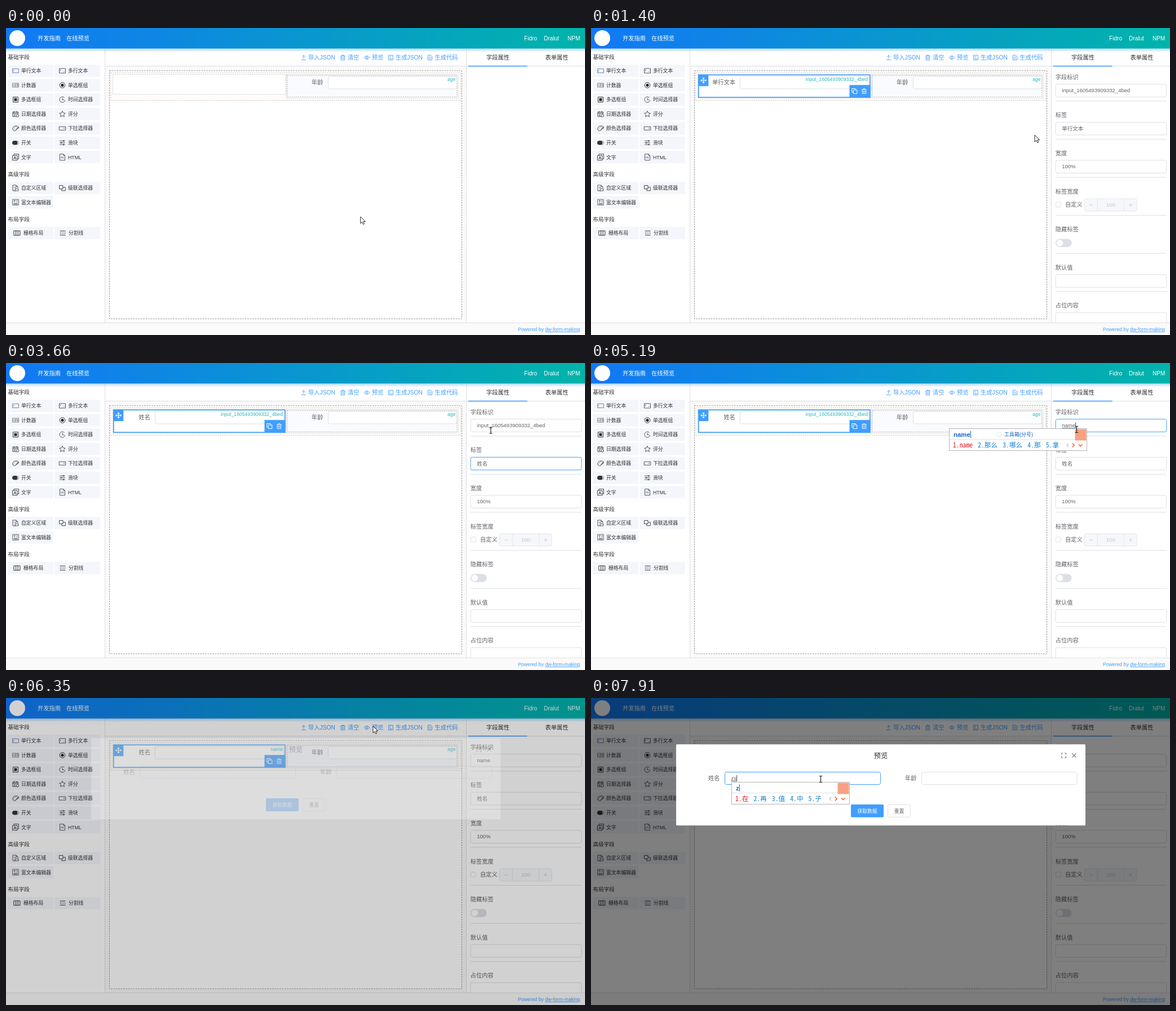
These frames come from a looping animation (1027x545 px, 7990 ms). An HTML page:

```html
<!DOCTYPE html>
<html lang="zh-CN">
<head>
<meta charset="utf-8">
<title>表单设计器</title>
<style>
html, body { margin: 0; width: 100%; height: 100%; overflow: hidden; background: #fff; }
svg { display: block; width: 1027px; height: 545px; }
text { font-family: "Liberation Sans", "Noto Sans CJK SC", "Noto Sans CJK", sans-serif; white-space: pre; }
.cand { font-family: "Noto Sans Mono CJK SC", "Liberation Mono", "Noto Sans CJK SC", monospace; }
</style>
</head>
<body>
<svg id="stage" viewBox="0 0 1027 545" xmlns="http://www.w3.org/2000/svg"></svg>
<script>
const LOOP = 7990;
const BLUE = '#409eff', INK = '#303133', GREY = '#606266', EDGE = '#dcdfe6';
const $ = id => document.getElementById(id);

// drawing helpers
const text = (x, y, s, size, fill, extra = '') =>
  `<text x="${x}" y="${y}" font-size="${size}" fill="${fill}" ${extra}>${s}</text>`;
const rect = (x, y, w, h, fill, extra = '') =>
  `<rect x="${x}" y="${y}" width="${w}" height="${h}" fill="${fill}" ${extra}/>`;
const path = (d, stroke, width = 1, extra = '') =>
  `<path d="${d}" fill="none" stroke="${stroke}" stroke-width="${width}" ${extra}/>`;
const dashed = (x, y, w, h, fill, stroke, dash = '2.2 1.6') =>
  rect(x, y, w, h, fill, `stroke="${stroke}" stroke-width=".9" stroke-dasharray="${dash}"`);
const input = (x, y, w, h, id = '') =>
  rect(x, y, w, h, '#fff', `rx="3" stroke="${EDGE}" ${id && `id="${id}"`}`);
const group = (id, body, extra = '') => `<g id="${id}" ${extra}>${body}</g>`;
const at = (x, y, body) => `<g transform="translate(${x} ${y})">${body}</g>`;

const page = 'M-4.5 -5.5H2L4.5 -3V5.5H-4.5ZM2 -5.5V-3H4.5';
const solid = d => `<path d="${d}" fill="#333"/>`;
const icons = {
  line: path('M-5.5 -3.5H5.5V3.5H-5.5ZM-3.5 -1.5V1.5', '#68789c', .9),
  area: path('M-5.5 -4H5.5V4H-5.5ZM-3.5 -2.2V.5', '#444', .9) + path('M2 2.2L4 .2', '#c44', .8),
  count: path('M-5.5 -3.5H5.5V3.5H-5.5ZM-3.7 -1.8V1.8M-1.5 -1.8H.8V0H-1.5V1.8H.8M2 -1.8H4V1.8H2M2 0H4', '#555', .7),
  radio: '<circle r="4.8" fill="none" stroke="#333"/><circle r="2.6" fill="#222"/>',
  check: path('M-4.5 -4.5H4.5V4.5H-4.5Z', '#333') + rect(-2.5, -2.5, 5, 5, '#222'),
  clock: path('M4.9 1A5 5 0 1 1 3.6 -3.5M0 -3V.5H3.2', '#444', .9),
  date: path('M1 4.5H-5V-3.5H4.5V0M-5 -1.2H4.5M-2.6 -5V-2.4M2 -5V-2.4M-3 1H0M-3 2.8H-1', '#333', .9) +
    '<circle cx="3.3" cy="3" r="2.3" fill="none" stroke="#333" stroke-width=".9"/>',
  star: path('M0 -5.3L1.6 -1.8L5.4 -1.4L2.5 1.1L3.4 4.9L0 2.9L-3.4 4.9L-2.5 1.1L-5.4 -1.4L-1.6 -1.8Z', '#444', .9),
  color: path('M-1.5 4.3C-7 4 -6.5 -3 -.5 -4.3C5 -5 6.5 -1 4.5 .5C2.5 1.5 1.5 .5 1 2C.8 3.5 0 4.4 -1.5 4.3Z', '#333', .9) +
    path('M-3.5 1.5h1M-3 -1.3h1M0 -2.6h1M2.8 -1.5h1M0 3L5.5 -3', '#333', 1),
  select: path('M-5.8 -3H5.8V3H-5.8Z', '#444', .9) + solid('M1.8 -.8H4.4L3.1 .9Z'),
  toggle: path('M-2.3 -3.3H2.3A3.3 3.3 0 0 1 2.3 3.3H-2.3A3.3 3.3 0 0 1 -2.3 -3.3Z', '#777', .8) +
    solid('M-2.3 -3.5H0A3.5 3.5 0 0 1 0 3.5H-2.3A3.5 3.5 0 0 1 -2.3 -3.5Z'),
  slider: path('M-5 -3.3H5M-5 0H5M-5 3.3H5', '#444', .9) + path('M2 -4.5v2.4M-2 -1.2v2.4M2 2.1v2.4', '#333', 1.4),
  words: path('M-5.5 -3H3V5.5H-5.5ZM-3 -3V-5.5H5.5V3H3M-3.4 3.8L-1.2 -1.3L1 3.8M-2.6 2H.2', '#333', .9),
  html: path(page, '#444', .9) + path('M-2.8 1.5h1.5M0 1.5h2.6M-2.8 -.2h5', '#487bb0', 1),
  custom: path('M0 5H-5V-5H1L4 -2V0M1 -5V-2H4M-3 -1H1', '#444', .9) + path('M-1 1.5H5V5H-1Z', '#444', .9),
  cascade: path('M-5.5 -4.5H1V1.5H-5.5ZM-1.2 1.5V4.8H5.3V-1.2H1', '#333', .9),
  rich: path('M-5.3 -5H5.3V5H-5.3ZM-3.5 -2.8H0M-1.8 -2.8V.3M1.5 -2.8H3.7M1.5 -.5H3.7M-3.5 2H3.7M-3.5 3.5H3.7', '#444', .8),
  grid: path('M-5.5 -4H5.5V4H-5.5ZM-1.8 -4V4M1.8 -4V4', '#333', 1),
  rule: path('M-5 -3.6H5M-5 0H-2M-.8 0H1.4M2.6 0H5M-5 3.6H5', '#333', 1)
};

function tile(name, icon, col, cy, dx = 0) {
  const x = 3 + col * 83;
  return rect(x, cy - 11, 81, 22, '#f4f6fc') +
    at(17 + col * 83 + dx * .6, cy, icons[icon]) +
    text(27 + col * 83 + dx, cy + 3.2, name, 8.8, '#333');
}

const sidebar = [
  ['单行文本', 'line'], ['多行文本', 'area'], ['计数器', 'count'], ['单选框组', 'radio'],
  ['多选框组', 'check'], ['时间选择器', 'clock'], ['日期选择器', 'date'], ['评分', 'star'],
  ['颜色选择器', 'color'], ['下拉选择器', 'select'], ['开关', 'toggle'], ['滑块', 'slider'],
  ['文字', 'words'], ['HTML', 'html']
].map(([n, i], k) => tile(n, i, k % 2, 76 + (k >> 1) * 25.55)).join('') +
  tile('自定义区域', 'custom', 0, 284) + tile('级联选择器', 'cascade', 1, 284) +
  tile('富文本编辑器', 'rich', 0, 309.3) +
  tile('栅格布局', 'grid', 0, 364, 4) + tile('分割线', 'rule', 1, 364, 1) +
  text(3.5, 55.2, '基础字段', 9.6, INK) + text(3.5, 262.7, '高级字段', 9.6, INK) +
  text(3.5, 342.7, '布局字段', 9.6, INK);

const trash = c => path('M-4.2 -2.8H4.2M-1.5 -2.8V-4.3H1.5V-2.8M-3.2 -2.8V4.4H3.2V-2.8M-1.1 -1V2.7M1.1 -1V2.7', c, .9);
const sheet = path('M-3.6 -4.2H1.6L3.6 -2.2V4.2H-3.6ZM-1.8 -.8H1.8M-1.8 1.6H1.8', BLUE, .9);
const toolbar = [
  [528, 536, '导入JSON', path('M-4 4H4M0 2V-4M-2.8 -1.2L0 -4L2.8 -1.2', BLUE, .9)],
  [597.5, 606, '清空', trash(BLUE)],
  [640, 649, '预览', path('M-5 0Q0 -6 5 0Q0 6 -5 0Z', BLUE, .9) + `<circle r="1.6" fill="none" stroke="${BLUE}" stroke-width=".9"/>`],
  [682.5, 691, '生成JSON', path('M-3.8 -4.2H3.8V4.2H-3.8ZM-2 -2H0M-2 0H-.5M-2 2.2H2', BLUE, .9)],
  [752, 760.5, '生成代码', sheet]
].map(([ix, tx, s, icon]) => at(ix, 52.5, icon) + text(tx, 56.2, s, 10.25, BLUE)).join('');

const header = rect(0, 36, 1027, 7, 'url(#glow)') + rect(0, 0, 1027, 36.4, 'url(#bar)') +
  '<circle cx="20" cy="18" r="14" fill="#fff"/>' +
  text(56, 21.7, '开发指南', 10.25, '#fff') + text(107, 21.7, '在线预览', 10.25, '#fff') +
  text(919, 21.7, 'Fidro', 10.1, '#fff') + text(954, 21.7, 'Dralut', 10.1, '#fff') +
  text(996, 21.7, 'NPM', 10.1, '#fff');

const frame = rect(176, 68, 640, 455, '#fafafa') +
  path('M175.5 37V523M816.5 37V523', '#dfdfdf') + path('M176 67.7H816M817 67.7H1027', '#e0e3e9', 1.3) +
  dashed(183.5, 75.8, 625, 440.4, '#fff', '#888', '2.6 1.8') +
  rect(820, 66.8, 104.5, 1.6, BLUE) +
  text(872.5, 55.6, '字段属性', 10.25, INK, 'text-anchor="middle"') +
  text(977, 55.6, '表单属性', 10.25, INK, 'text-anchor="middle"') +
  rect(0, 523, 1027, 22, '#fafafa') + path('M0 523.5H1027', '#e0e0e0') +
  text(908, 538, `Powered by <tspan text-decoration="underline">dw-form-making</tspan>`, 8.66, BLUE);

const MODEL = 'rgba(2,171,181,.85)';
const canvas = dashed(185.5, 79.5, 621, 49, '#fefcf9', '#d0c8bf') +
  dashed(497.3, 82.5, 304.7, 42.5, '#fff', '#ccc') +
  dashed(499, 84.2, 301, 38.3, '#f9fbff', '#aaa') +
  input(571.5, 86, 228, 22) + text(542, 100.3, '年龄', 10.25, GREY) +
  text(797.5, 94.3, 'age', 8.66, MODEL, 'text-anchor="end"');

const emptyCell = dashed(189.5, 82.5, 306.5, 35.2, '#fff', '#ccc');
const field = dashed(189.5, 82.5, 306.5, 42.5, '#fff', '#ccc') +
  input(264.5, 86, 228, 22) +
  rect(190.8, 83.3, 304, 39.8, 'none', `stroke="${BLUE}" stroke-width="1.7"`) +
  rect(190, 82.6, 18.3, 20.6, BLUE) + rect(458.5, 101.2, 37.2, 22.7, BLUE) +
  at(199.5, 93, path('M-4.5 0H4.5M0 -4.5V4.5M-3 -1.6L-4.7 0L-3 1.6M3 -1.6L4.7 0L3 1.6M-1.6 -3L0 -4.7L1.6 -3M-1.6 3L0 4.7L1.6 3', '#fff', 1.2)) +
  at(467.3, 112, path('M-2 -2H4.5V4.5H-2ZM-2 2H-4.5V-4.5H2V-2', '#fff', 1)) +
  at(484.5, 112, trash('#fff')) +
  text(256, 100.3, '', 10.25, GREY, 'id="label" text-anchor="end"') +
  text(491, 94.3, '', 8.66, MODEL, 'id="model" text-anchor="end"');

const ROW = 67.6;
const panel = ['字段标识', '标签', '宽度', '标签宽度', '隐藏标签', '默认值', '占位内容'].map((s, i) => {
  const y = i * ROW;
  const box = i == 3 || i == 4 ? '' : input(824.2, 99.7 + y, 196.6, 22.6, 'in' + i);
  return text(823.7, 90.8 + y, s, 10.25, GREY) + box +
    (i < 6 ? path(`M824 ${129.8 + y}H1021`, EDGE) : '');
}).join('') +
  rect(835, 171.5, 38, 14, '#3390ff', 'id="sel1"') + rect(835, 104, 121, 14, '#3390ff', 'id="sel0"') +
  text(835.3, 114.3, '', 9.5, GREY, 'id="val0"') + text(835.3, 181.9, '', 9.5, GREY, 'id="val1"') +
  text(835.3, 249.4, '100%', 9.5, GREY) +
  rect(824.5, 309, 8.8, 8.8, '#fff', `rx="1.3" stroke="${EDGE}"`) + text(841, 317.2, '自定义', 10.25, GREY) +
  rect(875.5, 303, 92.6, 22, '#f5f7fa', 'rx="3" stroke="#e4e7ed"') + path('M898.5 303V325M945.5 303V325', '#e4e7ed') +
  text(922, 317.2, '100', 9.5, '#c0c4cc', 'text-anchor="middle"') +
  path('M884 314H890M954 314H960M957 311V317', '#c8ccd4', .9) +
  rect(824, 374.5, 28.6, 14.4, EDGE, 'rx="7.2"') + '<circle cx="831.4" cy="381.7" r="5.8" fill="#fff"/>' +
  rect(817, 523, 210, 22, '#fafafa') + path('M817 523.5H1027', '#e0e0e0') +
  text(908, 538, `Powered by <tspan text-decoration="underline">dw-form-making</tspan>`, 8.66, BLUE);

const dialog = rect(151, 82.2, 726, 144, '#fff', 'rx="1.5"') +
  text(514, 107.2, '预览', 12.2, INK, 'text-anchor="middle"') +
  path('M834.5 100.5V98H837M840 98H842.5V100.5M842.5 103.5V106H840M837 106H834.5V103.5', '#777', 1.1) +
  path('M853.5 98.5L860.5 105.5M860.5 98.5L853.5 105.5', '#777', 1.1) +
  text(208, 146.2, '姓名', 10.25, GREY) + text(557, 146.2, '年龄', 10.25, GREY) +
  input(237.5, 131.5, 276, 22, 'name') + input(586.2, 131.5, 276, 22) +
  text(248.5, 146, '', 9.5, GREY, 'id="typed"') +
  rect(461, 189, 58, 22.8, BLUE, 'rx="2"') + text(490, 203.8, '获取数据', 8.8, '#fff', 'text-anchor="middle" font-weight="500"') +
  rect(526.5, 189.5, 40, 22, '#fff', `rx="2" stroke="${EDGE}"`) + text(546.5, 203.8, '重置', 8.8, GREY, 'text-anchor="middle" font-weight="500"');

$('stage').innerHTML = `<defs>
  <linearGradient id="bar"><stop stop-color="#1278f6"/><stop offset="1" stop-color="#00b4aa"/></linearGradient>
  <linearGradient id="glow" x2="0" y2="1"><stop stop-color="#46a0fc" stop-opacity=".42"/><stop offset="1" stop-color="#46a0fc" stop-opacity="0"/></linearGradient>
</defs>` + rect(0, 0, 1027, 545, '#fff') + frame + sidebar +
  group('hover', rect(3.5, 65.5, 80, 21, 'none', `stroke="${BLUE}" stroke-dasharray="2.2 1.6"`) + text(27, 79.2, '单行文本', 8.8, BLUE)) +
  toolbar + canvas + group('empty', emptyCell) + group('field', field) + group('panel', panel) + header +
  group('ghost', tile('单行文本', 'line', 0, 76), 'opacity=".6"') +
  rect(0, 0, 1027, 545, '#000', 'id="mask"') + group('dialog', dialog) +
  path('', '#333', .9, 'id="caret"') + group('ime', '') +
  group('arrow', '<path d="M0 0V12L2.8 9.4L4.8 13.6L6.8 12.7L4.9 8.7H8.6Z" fill="#fff" stroke="#111" stroke-width=".9"/>') +
  group('beam', path('M-2.6 -5.5H-.8L0 -5L.8 -5.5H2.6M0 -5V5M-2.6 5.5H-.8L0 5L.8 5.5H2.6', '#111', 1.1));

const show = (id, on) => $(id).setAttribute('display', on ? 'inline' : 'none');
const move = (id, x, y) => $(id).setAttribute('transform', `translate(${x} ${y})`);
const put = (id, s) => { if ($(id).textContent !== s) $(id).textContent = s; };
const focus = (id, on) => $(id).setAttribute('stroke', on ? BLUE : EDGE);
const within = (t, a, b) => t >= a && t < b;
const last = (list, t) => list.filter(e => e[0] <= t).pop();

// CSS "ease" curve
function ease(p) {
  if (p <= 0 || p >= 1) return p <= 0 ? 0 : 1;
  const bez = (a, b, u) => 3 * a * u * (1 - u) ** 2 + 3 * b * u * u * (1 - u) + u ** 3;
  let lo = 0, hi = 1;
  for (let i = 0; i < 24; i++) {
    const mid = (lo + hi) / 2;
    if (bez(.25, .25, mid) < p) lo = mid; else hi = mid;
  }
  return bez(.1, 1, lo);
}

const route = [
  [0, 628.8, 335], [70, 628.8, 335], [590, 50, 77], [690, 50, 77], [850, 132, 80], [1180, 300, 97],
  [1400, 787, 190], [1700, 877, 178], [1780, 877, 178], [1980, 784, 179], [2100, 791, 178],
  [3230, 791, 178], [3660, 860, 119.5], [3950, 861.5, 118], [5560, 861.5, 118], [6250, 651, 50],
  [6350, 651, 50], [6520, 655.5, 49], [7230, 657, 49], [7380, 407.5, 144], [LOOP, 407.5, 144]
];
function pointer(t) {
  const i = route.findIndex(p => p[0] > t), [t0, x0, y0] = route[i - 1], [t1, x1, y1] = route[i];
  const u = (t - t0) / (t1 - t0), k = u * u * (3 - 2 * u);
  return [x0 + (x1 - x0) * k, y0 + (y1 - y0) * k];
}

const KEY = 'input_1605493909332_4bed';
const keyText = [[0, KEY], [4480, 'n'], [4630, 'na'], [4705, 'nam'], [4780, 'name']];
const labelText = [[0, '单行文本'], [2460, 'x'], [2610, 'xm'], [2990, '姓名']];
const nameText = [[0, ''], [7740, 'z'], [7910, 'zs']];

// start, x, y, width, composition, candidates, hint
const popups = [
  [0],
  [2460, 822, 184, 205, 'x', '想 下 小 新 像'],
  [2610, 765, 184, 262, 'xm', '姓名 项目 熊猫 下面 羡慕'], [2990],
  [4480, 822, 116, 205, 'n', '你 那 呢 能 年'],
  [4630, 822, 116, 205, 'na', '那 拿 哪 呐 纳'],
  [4705, 635, 116, 245, 'nam', '那么 哪么 那 拿 哪'],
  [4780, 635, 116, 245, 'name', 'name 那么 哪么 那 拿', '工具箱(分号)'], [5270],
  [7740, 249, 149, 210, 'z', '在 再 值 中 子']
];
let popup;
function drawPopup(state) {
  if (state === popup) return;
  popup = state;
  const [, x, y, w, comp, words, hint] = state;
  if (!words) { $('ime').innerHTML = ''; return; }
  let cx = x + 7, row = '';
  words.split(' ').forEach((s, i) => {
    row += text(cx, y + 34, `${i + 1}.${s}`, 11.7, i ? '#0f80d6' : '#e8121d', 'class="cand"');
    cx += 11.7 + 9 + [...s].reduce((n, c) => n + (c < '~' ? 5.85 : 11.7), 0);
  });
  const r = x + w, m = y + 30;
  $('ime').innerHTML = rect(x + .5, y + .5, w - 1, 39, '#fff', 'stroke="#b4b4b4"') +
    path(`M${x + 1} ${y + 19.7}H${r - 1}`, '#ddd') +
    text(x + 8, y + 14.5, comp, 11.4, '#1064c8', 'font-weight="bold" id="comp"') + row +
    (hint ? `<circle cx="${x + 89}" cy="${y + 10.5}" r="4" fill="none" stroke="#e6e6e6"/>` + text(x + 98, y + 13.5, hint, 9, '#1064c8') : '') +
    path(`M${r - 33} ${m - 3}l-3 3l3 3`, '#bbb', 1.1) +
    path(`M${r - 26} ${m - 3.2}l3.2 3.2l-3.2 3.2M${r - 15} ${m - 1.5}l3.2 3.2l3.2 -3.2`, '#f0602a', 1.6) +
    rect(r - 21.5, y + 1.5, 20, 20, '#f7a182');
  const end = x + 8.8 + $('comp').getComputedTextLength();
  $('ime').innerHTML += path(`M${end} ${y + 4.5}V${y + 17}`, '#1064c8', 1);
}

function typing(id, on) {
  const el = $(id);
  el.setAttribute('text-decoration', on ? 'underline' : 'none');
  if (!on) return '';
  const x = +el.getAttribute('x') + el.getComputedTextLength() + .6, y = +el.getAttribute('y');
  return `M${x} ${y - 9}V${y + 2}`;
}

function render(t) {
  const [x, y] = pointer(t);
  const beam = within(t, 1580, 2060) || within(t, 3560, 5640) || t >= 7350;
  show('beam', beam); show('arrow', !beam);
  move('beam', x, y); move('arrow', x, y);

  show('hover', within(t, 540, 760));
  show('ghost', within(t, 720, 1180));
  move('ghost', x - 46, y - 14);
  const dropped = t >= 1180;
  show('empty', !dropped); show('field', dropped); show('panel', dropped);

  put('label', t < 2990 ? '单行文本' : '姓名');
  put('model', t < 5340 ? KEY : 'name');
  put('val0', last(keyText, t)[1]);
  put('val1', last(labelText, t)[1]);
  put('typed', last(nameText, t)[1]);
  focus('in1', within(t, 1780, 3750));
  focus('in0', within(t, 3750, 6270));
  focus('name', t >= 7380);

  // text selections
  const picked0 = within(t, 3870, 4480), from = t > 1980 ? 835 : Math.max(835, Math.min(873, x));
  const picked1 = within(t, 1780, 2460);
  show('sel0', picked0); show('sel1', picked1);
  $('sel1').setAttribute('x', from);
  $('sel1').setAttribute('width', 873 - from);
  $('val0').setAttribute('fill', picked0 ? '#fff' : GREY);
  $('val1').setAttribute('fill', picked1 && from < 850 ? '#fff' : GREY);

  $('caret').setAttribute('d', typing('val1', within(t, 2460, 2990)) +
    typing('val0', within(t, 4480, 5270)) + typing('typed', t >= 7740));
  drawPopup(last(popups, t));

  const open = t - 6296, k = ease(open / 300);
  show('mask', open > 0); show('dialog', open > 0);
  $('mask').setAttribute('opacity', .5 * ease(open / 240));
  $('dialog').setAttribute('opacity', k);
  move('dialog', 0, -14.7 * (1 - k));
}

const start = performance.now();
function tick() {
  render((performance.now() - start) % LOOP);
  requestAnimationFrame(tick);
}
tick();
</script>
</body>
</html>
```
